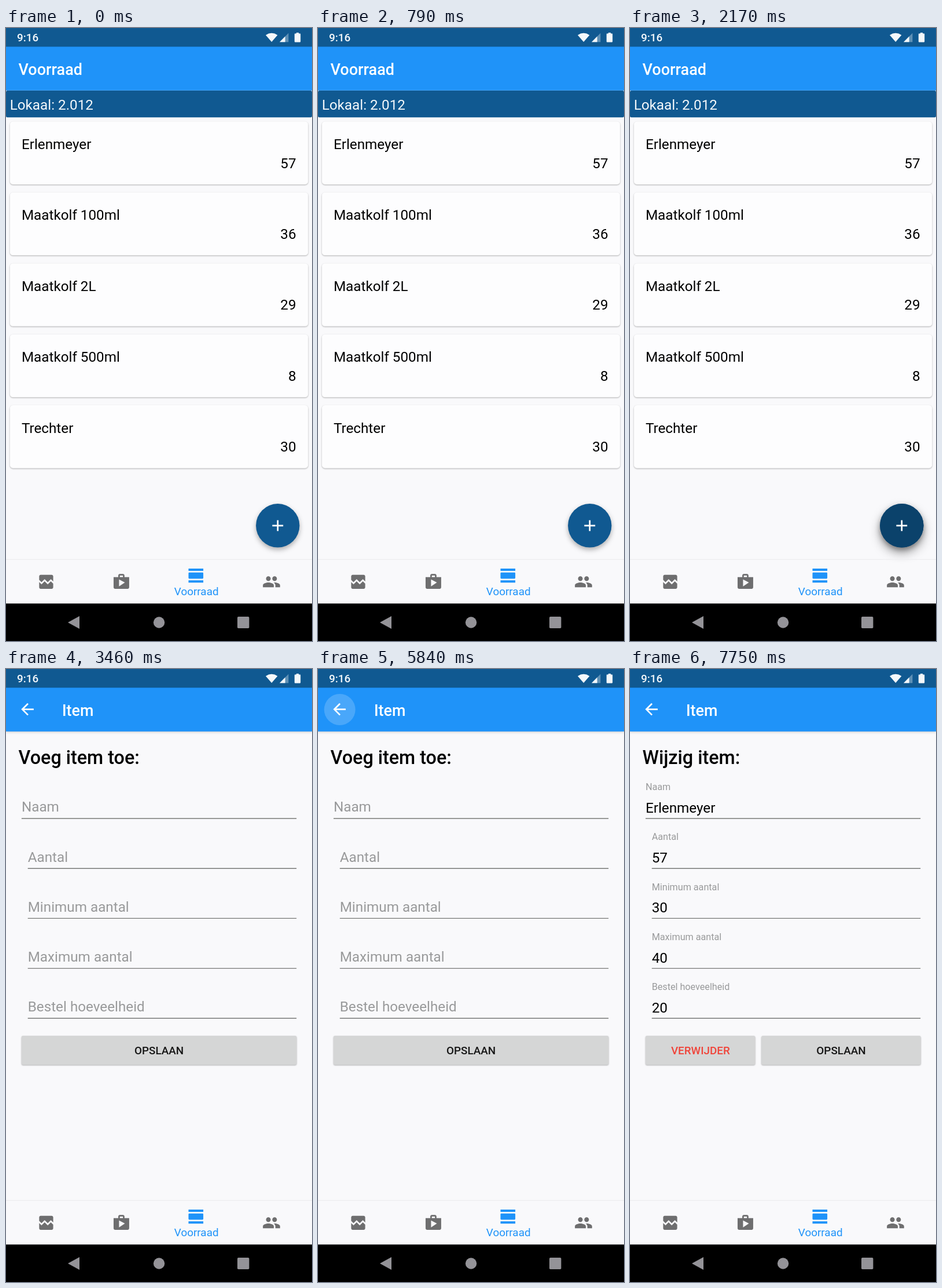
Animation of 529 by 1058 pixels, one loop 8000 ms. Source, as an HTML page:

```html
<!DOCTYPE html>
<html lang="nl">
<head>
<meta charset="utf-8">
<title>Voorraad</title>
<style>
  :root { --bg: #f9f9fb; --blue: #1f93f9; --navy: #105991; --loop: 8s infinite; }
  html, body { margin: 0; width: 100%; height: 100%; overflow: hidden; background: var(--bg); }
  svg { display: block; width: 100vw; height: 100vh; font-family: Roboto, sans-serif; }
  .med { font-weight: 500; }
  .t12 { font-size: 16.16px; }
  .t14 { font-size: 18.86px; }
  .t18 { font-size: 24.25px; }
  .t20 { font-size: 26.94px; }
  .t24 { font-size: 32.3px; }
  .mid { text-anchor: middle; }
  .end { text-anchor: end; }
  .hint { fill: #999a9b; }
  .card { fill: #fdfdfe; filter: drop-shadow(0 1px 1.3px rgba(0, 0, 0, .3)); }
  .btn { fill: #d5d6d6; filter: drop-shadow(0 1.5px 1.3px rgba(0, 0, 0, .3)); }
  .bar { filter: drop-shadow(0 1px 2px rgba(0, 0, 0, .2)); }
  .fab { fill: var(--navy); filter: drop-shadow(0 4px 4px rgba(0, 0, 0, .3)); }
  .lift { fill: var(--navy); filter: drop-shadow(0 9px 9px rgba(0, 0, 0, .36)); }
  .wave { transform-box: fill-box; transform-origin: center; }

  /* screens switch with hard cuts */
  .list { animation: list var(--loop) step-end; }
  .form { animation: form var(--loop) step-end; }
  .add { animation: add var(--loop) step-end; }
  .edit { animation: edit var(--loop) step-end; }
  @keyframes list { 0%, 73.5% { visibility: visible } 27.625%, 83.375%, 100% { visibility: hidden } }
  @keyframes form { 0%, 73.5% { visibility: hidden } 27.625%, 83.375%, 100% { visibility: visible } }
  @keyframes add { 0%, 73.5%, 100% { visibility: hidden } 27.625% { visibility: visible } }
  @keyframes edit { 0% { visibility: hidden } 83.375%, 100% { visibility: visible } }

  /* touch ripples */
  .lift { animation: lift var(--loop) linear; }
  .press { animation: press var(--loop) ease-out; }
  .back { animation: back var(--loop) ease-out; }
  .pick { animation: pick var(--loop) ease-out; }
  @keyframes lift {
    0%, 23.75% { opacity: 0 } 25.2%, 27.62% { opacity: 1 } 27.63%, 100% { opacity: 0 }
  }
  @keyframes press {
    0%, 23.75% { opacity: 0; transform: scale(.3) }
    26.6%, 27.62% { opacity: .26; transform: none }
    27.63%, 100% { opacity: 0; transform: none }
  }
  @keyframes back {
    0%, 56.75% { opacity: 0; transform: scale(.4) }
    59.6%, 73.49% { opacity: .19; transform: none }
    73.5%, 100% { opacity: 0; transform: none }
  }
  @keyframes pick {
    0%, 76.6% { opacity: 0; transform: scale(.2) }
    80.3%, 83.37% { opacity: .125; transform: none }
    83.375%, 100% { opacity: 0; transform: none }
  }
</style>
</head>
<body>
<svg viewBox="0 0 529 1058" preserveAspectRatio="none">
  <defs>
    <clipPath id="cardClip"><rect x="6.7" y="161.3" width="515.6" height="108.6" rx="5.4"/></clipPath>
    <clipPath id="fabClip"><circle cx="469.8" cy="858.8" r="37.7"/></clipPath>
  </defs>
  <rect width="529" height="1058" fill="var(--bg)"/>

  <rect class="bar" y="32" width="529" height="75.8" fill="var(--blue)"/>
  <rect width="529" height="32.3" fill="var(--navy)"/>
  <g fill="#f4f8fb">
    <text class="med t14" x="19" y="23">9:16</text>
    <path d="M449 12.3Q459.2 5.4 469.4 12.3L459.2 24Z"/>
    <path d="M473 24.2L488.4 8.8V24.2Z" opacity=".35"/>
    <path d="M473 24.2L482.6 14.6V24.2Z"/>
    <path d="M502 8h4v1.6h2a1.2 1.2 0 0 1 1.2 1.2v12.4a1.2 1.2 0 0 1-1.2 1.2h-8a1.2 1.2 0 0 1-1.2-1.2V10.800a1.2 1.2 0 0 1 1.2-1.2h2z"/>
  </g>

  <g class="list">
    <text class="med t20" x="21.5" y="81" fill="#fff">Voorraad</text>
    <rect y="108" width="529" height="46.2" rx="2.5" fill="var(--navy)"/>
    <text class="t18" x="6.7" y="140.500" fill="#f4f8fb">Lokaal: 2.012</text>
    <g id="cards"></g>
    <g clip-path="url(#cardClip)"><circle class="wave pick" cx="264.5" cy="216" r="268"/></g>
    <g id="rows"></g>
    <circle class="fab" cx="469.8" cy="858.8" r="37.7"/>
    <circle class="lift" cx="469.8" cy="858.8" r="37.7"/>
    <g clip-path="url(#fabClip)"><circle class="wave press" cx="469.8" cy="858.8" r="38.5"/></g>
    <path d="M460.400 858.8h18.800M469.8 849.400v18.800" stroke="#fff" stroke-width="2.7"/>
  </g>

  <g class="form">
    <circle class="wave back" cx="37.6" cy="70" r="27" fill="#fff"/>
    <path transform="translate(20.900 53.400) scale(1.347)" fill="#fff"
      d="M20 11H7.830l5.590-5.590L12 4l-8 8 8 8 1.410-1.410L7.830 13H20z"/>
    <text class="med t20" x="97" y="81" fill="#fff">Item</text>
    <g id="lines" stroke="#777876" stroke-width="1.4"></g>
  </g>
  <g class="add" id="add">
    <text class="med t24" x="21.5" y="163.500">Voeg item toe:</text>
    <rect class="btn" x="26.900" y="633" width="475.400" height="50" rx="2.7"/>
    <text class="med t14 mid" x="264.600" y="664.600" fill="#161616">OPSLAAN</text>
  </g>
  <g class="edit" id="edit">
    <text class="med t24" x="21.5" y="163.500">Wijzig item:</text>
    <rect class="btn" x="26.900" y="633" width="189.400" height="50" rx="2.7"/>
    <rect class="btn" x="227.300" y="633" width="275.300" height="50" rx="2.7"/>
    <text class="med t14 mid" x="121.800" y="664.600" fill="#f0443a">VERWIJDER</text>
    <text class="med t14 mid" x="365" y="664.600" fill="#161616">OPSLAAN</text>
  </g>

  <rect y="916.500" width="529" height="1.5" fill="#efeff1"/>
  <g fill="#6e6e6f">
    <path transform="translate(53.300 939.600) scale(1.347)" d="M21 5v6.590l-3-3.010-4 4.010-4-4-4 4-3-3.010V5c0-1.100.9-2 2-2h14c1.100 0 2 .9 2 2zm-3 6.420l3 3.010V19c0 1.100-.9 2-2 2H5c-1.100 0-2-.9-2-2v-6.580l3 2.990 4-4 4 4 4-3.990z"/>
    <path transform="translate(183.300 939.600) scale(1.347)" d="M16 6V4c0-1.110-.89-2-2-2h-4c-1.110 0-2 .89-2 2v2H2v13c0 1.110.89 2 2 2h16c1.110 0 2-.89 2-2V6h-6zm-6-2h4v2h-4V4zM9 18V9l7.500 4L9 18z"/>
    <path transform="translate(442.800 939.600) scale(1.347)" d="M16 11c1.660 0 2.990-1.340 2.990-3S17.660 5 16 5c-1.660 0-3 1.340-3 3s1.340 3 3 3zm-8 0c1.660 0 2.990-1.340 2.990-3S9.660 5 8 5C6.340 5 5 6.340 5 8s1.340 3 3 3zm0 2c-2.330 0-7 1.170-7 3.500V19h14v-2.500c0-2.330-4.670-3.500-7-3.500zm8 0c-.29 0-.62.02-.97.05 1.160.84 1.970 1.970 1.970 3.450V19h6v-2.500c0-2.330-4.670-3.500-7-3.500z"/>
  </g>
  <g fill="var(--blue)">
    <path transform="translate(312.800 928.900) scale(1.347)" d="M2 21h19v-3H2v3zM20 8H3c-.55 0-1 .45-1 1v6c0 .55.45 1 1 1h17c.55 0 1-.45 1-1V9c0-.55-.45-1-1-1zM2 3v3h19V3H2z"/>
    <text class="t14 mid" x="329.200" y="979.300">Voorraad</text>
  </g>

  <rect y="993.300" width="529" height="65" fill="#000"/>
  <g fill="#949398">
    <path d="M107 1026L127 1015V1037Z"/>
    <circle cx="264.600" cy="1026" r="9.700"/>
    <rect x="400" y="1016" width="20.400" height="20" rx="1.8"/>
  </g>
</svg>
<script>
  const stock = [['Erlenmeyer', 57], ['Maatkolf 100ml', 36], ['Maatkolf 2L', 29], ['Maatkolf 500ml', 8], ['Trechter', 30]];
  const fields = [['Naam', 'Erlenmeyer'], ['Aantal', 57], ['Minimum aantal', 30], ['Maximum aantal', 40], ['Bestel hoeveelheid', 20]];

  const put = (id, html) => document.getElementById(id).insertAdjacentHTML('beforeend', html);
  const text = (cls, x, y, str) => `<text class="${cls}" x="${x}" y="${y}">${str}</text>`;

  stock.forEach(([name, count], i) => {
    const y = 161.3 + i * 122.45;
    put('cards', `<rect class="card" x="6.7" y="${y}" width="515.6" height="108.6" rx="5.4"/>`);
    put('rows', text('t18', 26.9, y + 47.4, name) + text('t18 end', 501.6, y + 80.2, count));
  });

  fields.forEach(([label, value], i) => {
    const x = i ? 37.7 : 26.9, y = 258 + i * 86.2;
    put('lines', `<path d="M${x} ${y}H502.2"/>`);
    put('add', text('t18 hint', x, y - 11.6, label));
    put('edit', text('t12 hint', x, y - 48.8, label) + text('t18', x, y - 10, value));
  });
</script>
</body>
</html>
```
